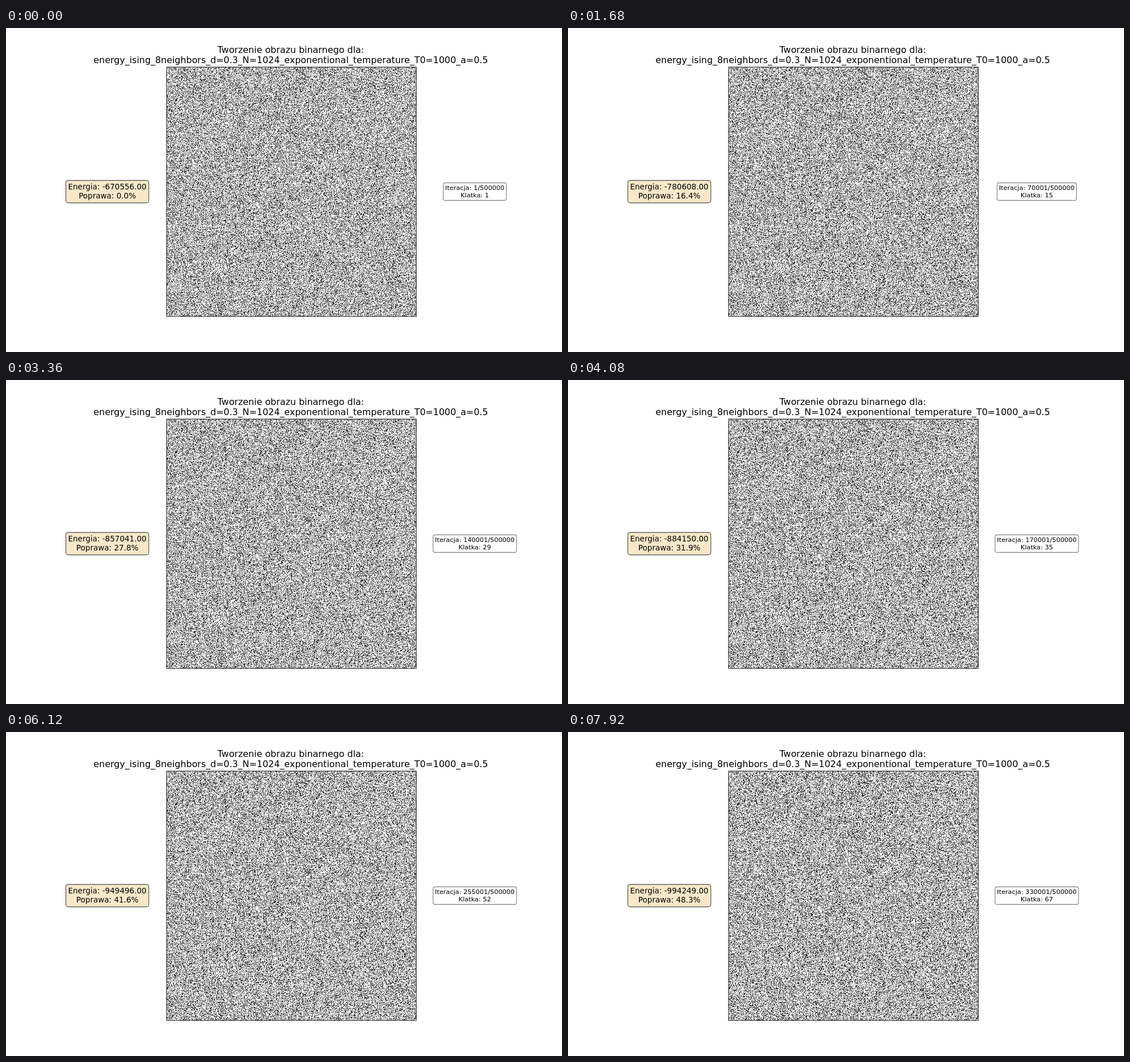
Write an HTML page with a canvas that moves like this. It is 980 px wide and 572 px high and loops after 8000 ms.

```html
<!DOCTYPE html>
<html lang="pl">
<head>
<meta charset="utf-8">
<title>Obraz binarny</title>
<style>
html, body { margin: 0; width: 100%; height: 100%; overflow: hidden; background: #fff; }
canvas { display: block; }
</style>
</head>
<body>
<canvas id="stage" width="980" height="572"></canvas>
<script>
const ctx = document.getElementById('stage').getContext('2d');

const LOOP = 8000, STEP = 120, SWAPS = 5000, TOTAL = 500000;
const PT = 980 / 12 / 72;                       // pixels per point
const SIDE = 1024, MASK = SIDE * SIDE - 1, DENSITY = 0.3;
const PLOT = 539;                               // plotted cells per side before scaling
const VIEW = { x: 283, y: 69, size: 440 };
const MID_X = 502, MID_Y = 288.86;
const AROUND = [-SIDE - 1, -SIDE, -SIDE + 1, -1, 1, SIDE - 1, SIDE, SIDE + 1];

// Known energies as [step, value]; the curve between them is smooth.
const ENERGY = [[0, 670556], [14, 780608], [23, 832581], [34, 884150],
  [41, 913517], [51, 949496], [66, 994249]];

function energyAt(step) {
  let sum = 0;
  for (const [a, value] of ENERGY) {
    let term = value;
    for (const [b] of ENERGY) if (b !== a) term *= (step - b) / (a - b);
    sum += term;
  }
  return Math.round(sum);
}

function seeded(seed) {
  return () => {
    seed = (seed + 0x6D2B79F5) | 0;
    let t = Math.imul(seed ^ (seed >>> 15), 1 | seed);
    t = (t + Math.imul(t ^ (t >>> 7), 61 | t)) ^ t;
    return ((t ^ (t >>> 14)) >>> 0) / 4294967296;
  };
}

const start = new Int8Array(SIDE * SIDE);
const fillRandom = seeded(11);
for (let i = 0; i <= MASK; i++) start[i] = fillRandom() < DENSITY ? -1 : 1;

const spins = new Int8Array(SIDE * SIDE);
let random, simStep;

function reset() {
  spins.set(start);
  random = seeded(42);
  simStep = 0;
}

function field(i) {
  let sum = 0;
  for (let n = 0; n < 8; n++) sum += spins[(i + AROUND[n]) & MASK];
  return sum;
}

// Swap two random cells whenever that lowers the energy.
function trySwap() {
  const i = (random() * SIDE * SIDE) | 0, j = (random() * SIDE * SIDE) | 0;
  const a = spins[i], b = spins[j];
  if ((b - a) * (field(i) - field(j)) > 0) { spins[i] = b; spins[j] = a; }
}

function simulateTo(step) {
  if (step < simStep) reset();
  for (; simStep < step; simStep++)
    for (let n = 0; n < SWAPS; n++) trySwap();
}

// Smooth reduction of the plotted cells to screen pixels.
const sinc = x => x ? Math.sin(Math.PI * x) / (Math.PI * x) : 1;
const lanczos = x => Math.abs(x) < 3 ? sinc(x) * sinc(x / 3) : 0;
const RATIO = PLOT / VIEW.size;

const taps = Array.from({ length: VIEW.size }, (_, p) => {
  const center = (p + 0.5) * RATIO, list = [];
  const from = Math.max(0, Math.ceil(center - 3 * RATIO - 0.5));
  const to = Math.min(PLOT - 1, Math.floor(center + 3 * RATIO - 0.5));
  for (let c = from; c <= to; c++) list.push(lanczos((c + 0.5 - center) / RATIO));
  const sum = list.reduce((a, b) => a + b);
  return { from, weights: list.map(w => w / sum) };
});

const cell = c => ((c + 0.5) * SIDE / PLOT) | 0;
const rows = new Float32Array(PLOT * VIEW.size);
const line = new Float32Array(PLOT);
const image = ctx.createImageData(VIEW.size, VIEW.size);
const pixels = new Uint32Array(image.data.buffer);

function drawSpins() {
  const size = VIEW.size;
  for (let r = 0; r < PLOT; r++) {
    for (let c = 0; c < PLOT; c++) line[c] = spins[cell(r) * SIDE + cell(c)] > 0 ? 255 : 0;
    for (let x = 0; x < size; x++) {
      const { from, weights } = taps[x];
      let sum = 0;
      for (let n = 0; n < weights.length; n++) sum += weights[n] * line[from + n];
      rows[r * size + x] = sum;
    }
  }
  for (let y = 0; y < size; y++) {
    const { from, weights } = taps[y];
    for (let x = 0; x < size; x++) {
      let sum = 0;
      for (let n = 0; n < weights.length; n++) sum += weights[n] * rows[(from + n) * size + x];
      const gray = Math.max(0, Math.min(255, Math.round(sum)));
      pixels[y * size + x] = 0xff000000 | (gray * 0x010101);
    }
  }
  ctx.putImageData(image, VIEW.x, VIEW.y);
  ctx.strokeStyle = '#000';
  ctx.lineWidth = 0.8 * PT;
  ctx.strokeRect(VIEW.x, VIEW.y, size + 0.2, size + 0.2);
}

function setFont(points) {
  ctx.font = `${points * PT}px "DejaVu Sans", sans-serif`;
  ctx.textAlign = 'center';
}

function drawLines(lines, x, baselines) {
  ctx.fillStyle = '#000';
  lines.forEach((text, n) => ctx.fillText(text, x, baselines[n]));
}

function drawLabel({ x, points, height, fill, alpha, baselines }, lines) {
  setFont(points);
  const pad = 0.3 * points * PT;
  const width = Math.max(...lines.map(s => ctx.measureText(s).width)) + 2 * pad;
  ctx.globalAlpha = alpha;
  ctx.beginPath();
  ctx.roundRect(x - width / 2, MID_Y - height / 2, width, height, pad);
  ctx.fillStyle = fill;
  ctx.fill();
  ctx.strokeStyle = '#000';
  ctx.lineWidth = PT;
  ctx.stroke();
  ctx.globalAlpha = 1;
  drawLines(lines, x, baselines);
}

const energyLabel = { x: 178.6, points: 11.93, height: 39.6, fill: 'wheat', alpha: 0.7, baselines: [285, 301] };
const stepLabel = { x: 826.3, points: 10, height: 31, fill: 'white', alpha: 0.5, baselines: [286, 299] };

function draw(step) {
  simulateTo(step);
  ctx.fillStyle = '#fff';
  ctx.fillRect(0, 0, 980, 572);
  drawSpins();

  setFont(14.03);
  drawLines(['Tworzenie obrazu binarnego dla:',
    'energy_ising_8neighbors_d=0.3_N=1024_exponentional_temperature_T0=1000_a=0.5'],
    MID_X, [44, 62]);

  const energy = energyAt(step);
  const better = (energy / ENERGY[0][1] - 1) * 100;
  drawLabel(energyLabel, [`Energia: -${energy}.00`, `Poprawa: ${better.toFixed(1)}%`]);
  drawLabel(stepLabel, [`Iteracja: ${step * SWAPS + 1}/${TOTAL}`, `Klatka: ${step + 1}`]);
}

let shown = -1;
function tick() {
  const step = Math.floor((performance.now() % LOOP) / STEP);
  if (step !== shown) draw(shown = step);
  requestAnimationFrame(tick);
}

reset();
tick();
</script>
</body>
</html>
```
